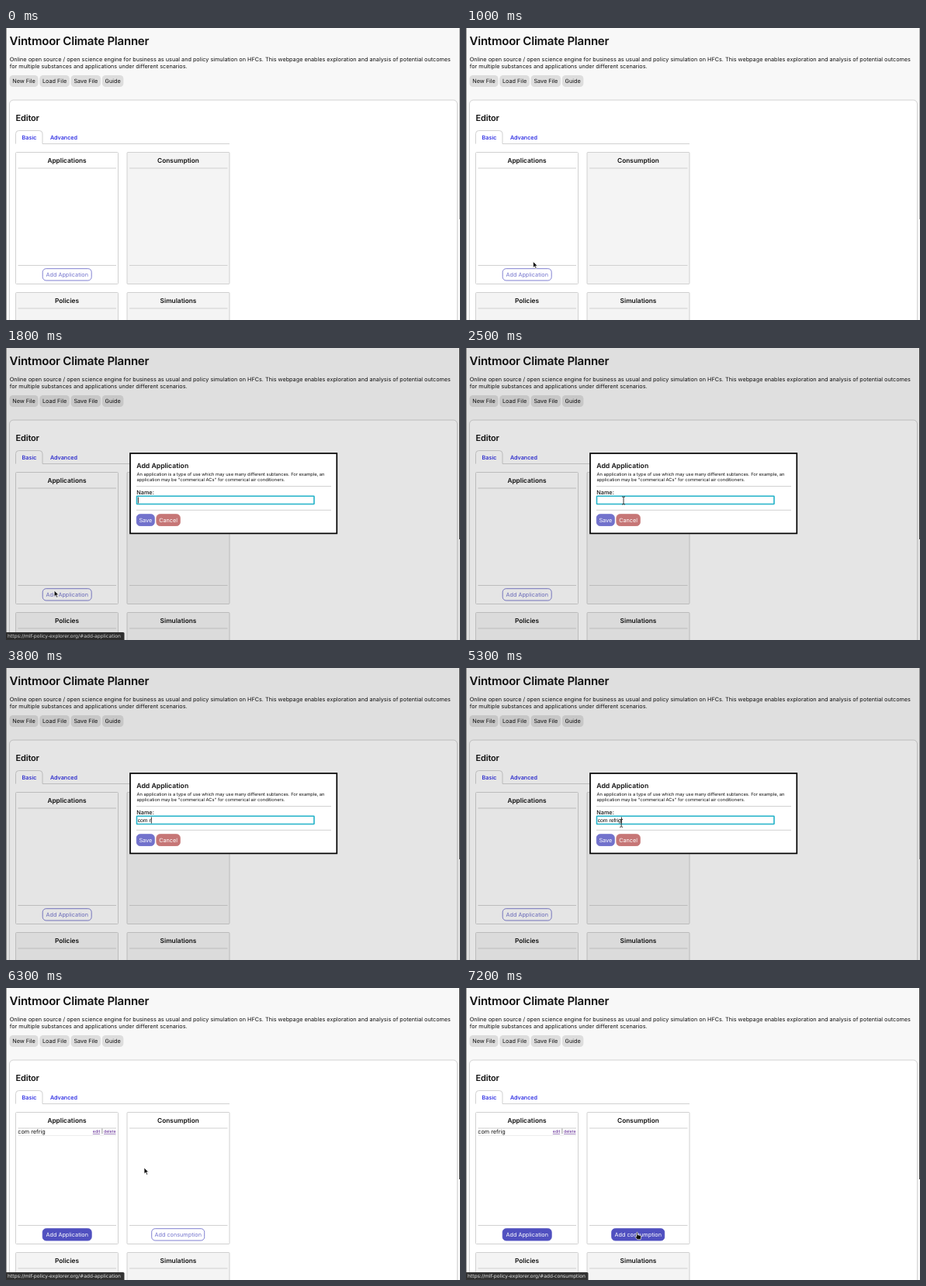
An HTML page that plays this animation: 585 px wide and 377 px high, repeating every 8 s.

```html
<!DOCTYPE html>
<html lang="en">
<head>
<meta charset="utf-8">
<title>Policy simulation editor</title>
<style>
  html, body { margin: 0; width: 100%; height: 100%; overflow: hidden; background: #f8f8f8; }
  svg { display: block; width: 100vw; height: 100vh; }
  text { font-family: Inter, "Open Sans", sans-serif; font-size: 7.27px; fill: #111; text-rendering: geometricPrecision; }
  .title { font-size: 15px; font-weight: 600; letter-spacing: -.22px; }
  .h2 { font-size: 11px; font-weight: 600; letter-spacing: -.2px; }
  .h3 { font-size: 8.3px; font-weight: 600; }
  .h4 { font-size: 8.7px; font-weight: 600; }
  .mid { text-anchor: middle; }
  .tab { fill: #1a1ae0; font-weight: 500; }
  .small { font-size: 5.78px; }
  .link { font-size: 5.3px; fill: #551a8b; text-decoration: underline; }
  .typed { font-family: "Liberation Sans", Arial, sans-serif; font-size: 6.8px; fill: #000; }
  .status { font-family: "DejaVu Sans", sans-serif; font-size: 6.17px; fill: #e8e8e8; }
  .line { stroke: #ccc; stroke-width: .9; fill: none; }
</style>
</head>
<body>
<svg id="stage" viewBox="0 0 585 377" preserveAspectRatio="none"></svg>
<script>
const LOOP = 8000, STEP = 100;
const OPEN = 1800, SAVED = 6300, TYPE_START = 3300, TYPE_END = 5300;
const INDIGO = '#5050c0', RED = '#b85454', BORDER = '#ccc', GREY = '#f4f4f4', TEAL = '#22b2c8';
const stage = document.getElementById('stage');

function add(parent, tag, attrs, content) {
  const node = document.createElementNS('http://www.w3.org/2000/svg', tag);
  for (const key in attrs) node.setAttribute(key, attrs[key]);
  if (content) node.textContent = content;
  return parent.appendChild(node);
}
const group = parent => add(parent, 'g', {});
const text = (parent, x, y, content, cls = '') => add(parent, 'text', { x, y, class: cls }, content);
const rule = (parent, x1, x2, y) => add(parent, 'path', { d: `M${x1} ${y}H${x2}`, class: 'line' });
const box = (parent, x, y, width, height, fill, rx = 0, stroke = 'none', line = .9) =>
  add(parent, 'rect', { x, y, width, height, rx, fill, stroke, 'stroke-width': line });
const show = (node, on) => node.setAttribute('visibility', on ? 'visible' : 'hidden');

function panel(x, y, title, fill) {
  const rect = box(page, x, y, 132, 170, fill, 1, BORDER);
  text(page, x + 66, y + 13.5, title, 'h3 mid');
  for (const dy of [20.5, 146]) rule(page, x + 3, x + 129.5, y + dy);
  return rect;
}

// Buttons are slightly faded until they are hovered or focused
function button(parent, x, y, width, height, label, color, solid) {
  const g = group(parent);
  const back = box(g, x, y, width, height, '#fff', 4.5);
  const face = box(g, x, y, width, height, color, 4.5, color);
  const caption = text(g, x + width / 2, y + height / 2 + 2.7, label, 'mid');
  const set = on => {
    face.setAttribute('fill', solid || on ? color : '#fff');
    face.setAttribute('opacity', on ? 1 : .8);
    caption.style.fill = solid || on ? '#fff' : color;
    caption.setAttribute('opacity', on || solid ? 1 : .8);
  };
  set(false);
  return { g, set, rect: back };
}

function contains(rect, [px, py]) {
  const { x, y, width, height } = rect;
  const dx = px - x.baseVal.value, dy = py - y.baseVal.value;
  return dx >= 0 && dx <= width.baseVal.value && dy >= 0 && dy <= height.baseVal.value;
}

// Page
const page = group(stage);
box(page, 0, 0, 585, 377, '#f8f8f8');
text(page, 4.5, 22, 'Vintmoor Climate Planner', 'title');
text(page, 4.7, 43, 'Online open source / open science engine for business as usual and policy simulation on HFCs. This webpage enables exploration and analysis of potential outcomes');
text(page, 4.7, 52, 'for multiple substances and applications under different scenarios.');
let left = 4.5;
for (const [label, width] of [['New File', 37], ['Load File', 38.5], ['Save File', 38.5], ['Guide', 27.5]]) {
  box(page, left, 61, width, 15, '#ddd', 4.5);
  text(page, left + width / 2, 71, label, 'mid');
  left += width + 1.8;
}
box(page, 4.5, 93, 577, 300, '#fff', 5, BORDER);
text(page, 12.6, 120.2, 'Editor', 'h2');
add(page, 'path', { d: 'M12.5 149.5V136.5Q12.5 132.5 16.5 132.5H43Q47 132.5 47 136.5V149.5H288', class: 'line' });
text(page, 30, 144, 'Basic', 'tab mid');
text(page, 74.5, 144, 'Advanced', 'tab mid');
panel(12.5, 160.5, 'Applications', '#fff');
const consumption = panel(156, 160.5, 'Consumption', GREY);
panel(12.5, 341.5, 'Policies', GREY);
panel(156, 341.5, 'Simulations', GREY);
const addApp = button(page, 47.2, 310.7, 63, 15.3, 'Add Application', INDIGO);
const addUse = button(page, 187.7, 310.7, 68, 15.3, 'Add consumption', INDIGO);

const item = group(page);
text(item, 15.3, 188.2, 'com refrig');
text(item, 111.8, 187.4, 'edit', 'link');
text(item, 122.9, 187.4, '|', 'small');
text(item, 126, 187.4, 'delete', 'link');
rule(item, 15.5, 142, 190.5).setAttribute('opacity', .4);

box(page, 0, 0, .8, 377, '#888');
const scrollbar = box(page, 584, 0, 1, 247, '#000');

const status = group(stage);
const statusBox = box(status, -2, 367, 154.5, 12, '#333', 1.5);
const statusText = text(status, 2, 374.4, '', 'status');

// Dialog
const dialog = group(stage);
box(dialog, 0, 0, 585, 377, '#000').setAttribute('opacity', .1);
box(dialog, 160, 136, 266.3, 103.4, '#fff', 0, '#000', 1.7);
text(dialog, 168.2, 155.3, 'Add Application', 'h4');
text(dialog, 168.5, 165.2, 'An application is a type of use which may use many different subtances. For example, an', 'small');
text(dialog, 168.5, 172.2, 'application may be "commerical ACs" for commerical air conditioners.', 'small');
rule(dialog, 168, 419, 178.5);
text(dialog, 168.3, 189.2, 'Name:').style.fontWeight = 500;
const field = box(dialog, 168.5, 191.3, 228.5, 10.2, '#fff', .5);
const typed = text(dialog, 169.7, 198.8, '', 'typed');
const caret = box(dialog, 0, 192.5, .8, 8, '#000');
rule(dialog, 168, 419, 209.3);
const save = button(dialog, 168.3, 214.7, 23, 14.8, 'Save', INDIGO, true);
button(dialog, 193.9, 214.7, 30.4, 14.8, 'Cancel', RED, true);

// Pointer shapes, each with its hot spot at the origin
const pointer = group(stage);
const shape = d => add(pointer, 'path', {
  d, fill: '#111', stroke: '#fff', 'stroke-width': .7, 'stroke-linejoin': 'round'
});
const shapes = {
  arrow: shape('M0 0V8L1.9 6.3L3.2 9.3L4.6 8.7L3.3 5.8H5.8Z'),
  hand: shape('M-.8 .3Q0 -.6 .8 .3V3.2L4.4 4Q5.4 4.3 5.2 5.4L4.6 9.2H.2L-2.6 5.6Q-2.2 4.5 -.8 5.6Z'),
  beam: add(pointer, 'path', {
    d: 'M-2 -5Q0 -5 0 -4Q0 -5 2 -5M0 -4V4M-2 5Q0 5 0 4Q0 5 2 5', fill: 'none', stroke: '#222', 'stroke-width': .9
  })
};

// Where the pointer rests or turns: time, x, y
const stops = [
  [500, 145, 210], [1200, 72, 324], [1500, 63, 313], [1900, 62, 313], [2500, 203, 197],
  [5200, 203, 197], [5700, 175.5, 230], [5900, 175.5, 230], [6000, 175.5, 227],
  [6200, 175.5, 227], [6900, 220.5, 315.5]
];

const ramp = (t, a, b) => Math.min(1, Math.max(0, (t - a) / (b - a)));
const ease = k => k * k * (3 - 2 * k);
const within = (t, a, b) => t >= a && t < b;

function position(t) {
  let [, x, y] = stops[0];
  for (let i = 1; i < stops.length; i++) {
    const k = ease(ramp(t, stops[i - 1][0], stops[i][0]));
    x += (stops[i][1] - x) * k;
    y += (stops[i][2] - y) * k;
  }
  return [x, y];
}

// Each burst types one character per step
const bursts = [[TYPE_START, 'com'], [3700, ' re'], [4500, 'frig']];
const typedAt = t => bursts.map(([from, part]) => part.slice(0, Math.max(0, (t - from) / STEP + 1))).join('');

function render(t) {
  const open = within(t, OPEN, SAVED), saved = t >= SAVED;
  const at = position(t);
  const overApp = !open && contains(addApp.rect, at);
  const overUse = saved && contains(addUse.rect, at);
  const overSave = open && contains(save.rect, at);
  const overField = open && contains(field, at);

  show(dialog, open);
  show(item, saved);
  show(addUse.g, saved);
  consumption.setAttribute('fill', saved ? '#fff' : GREY);
  addApp.set(overApp || saved);
  addUse.set(overUse);
  save.set(overSave);

  const dark = t < 1700 ? 0 : 1 - ramp(t, 3700, 4200) + ramp(t, 5200, 5700);
  scrollbar.setAttribute('opacity', .3 + .45 * dark);

  const focused = open && t < 5500;
  field.setAttribute('stroke', focused ? TEAL : '#888');
  field.setAttribute('stroke-width', focused ? 1.6 : .8);
  typed.textContent = typedAt(t);
  caret.setAttribute('x', 169.9 + (typed.textContent ? typed.getComputedTextLength() : 0));
  show(caret, focused && !within(t, 2500, 3000));

  statusText.textContent = 'https://mlf-policy-explorer.org/#add-' + (t >= 7100 ? 'consumption' : 'application');
  statusBox.setAttribute('width', 154.5 + 5 * ramp(t, 7100, 7200));
  status.setAttribute('opacity', saved ? 1 : ramp(t, 1300, 1500) * (1 - ramp(t, 2100, 2500)));

  const kind = overApp || overUse || overSave ? 'hand' : overField ? 'beam' : 'arrow';
  const visible = t >= 500 && !within(t, TYPE_START, TYPE_END);
  for (const name in shapes) show(shapes[name], visible && name === kind);
  pointer.setAttribute('transform', `translate(${at})`);
}

const start = performance.now();
function tick() {
  const t = Math.max(0, performance.now() - start) % LOOP;
  render(Math.floor(t / STEP) * STEP);
  requestAnimationFrame(tick);
}
tick();
</script>
</body>
</html>
```
